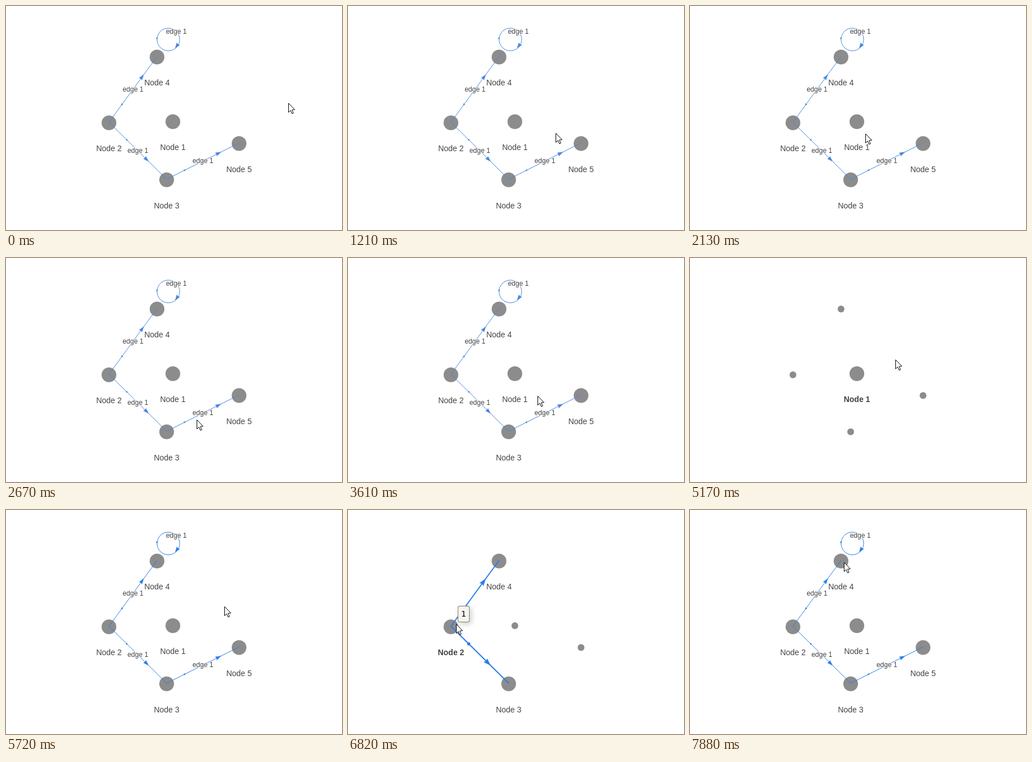
An HTML page with a canvas that plays this animation: 594x395 px, repeating every 8000 ms.

```html
<!DOCTYPE html>
<html lang="en">
<head>
<meta charset="utf-8">
<title>Network graph</title>
<style>
html, body { margin: 0; width: 100%; height: 100%; overflow: hidden; background: #fff; }
canvas { display: block; }
</style>
</head>
<body>
<canvas id="stage" width="594" height="395"></canvas>
<script>
const ctx = document.getElementById('stage').getContext('2d');
const LOOP = 8000, TICK = 76, TIP_DELAY = 300;
const SANS = '"Liberation Sans", Arial, sans-serif';
const TIP_FONT = '14px "DejaVu Sans", Verdana, sans-serif';
const GRAY = '#8c8c8c', INK = '#444', BLUE = '#2b7ce9', SOFT_BLUE = '#4686dc';
const NODE_BOX = 31.5; // half size of the square that dots and arrows keep clear of

const nodes = [
  { id: 1, x: 295, y: 203 },
  { id: 2, x: 182, y: 205 },
  { id: 3, x: 284, y: 305.5 },
  { id: 4, x: 267, y: 89 },
  { id: 5, x: 412, y: 241.5 }
];
const link = (a, b) => ({ from: nodes[a - 1], to: nodes[b - 1] });
const edges = [link(2, 4), link(2, 3), link(3, 5), link(4, 4)];

// Where the pointer goes and rests; a click selects what lies under it
const stops = [
  { leave: 0, arrive: 0, x: 499, y: 171 },
  { leave: 70, arrive: 450, x: 414, y: 239 },
  { leave: 1210, arrive: 1510, x: 300, y: 202 },
  { leave: 2130, arrive: 2670, x: 337, y: 285 },
  { leave: 2750, arrive: 2990, x: 327, y: 282 },
  { leave: 3610, arrive: 4010, x: 349, y: 171 },
  { leave: 4330, arrive: 4480, x: 306, y: 199 },
  { leave: 5090, arrive: 5400, x: 386, y: 170 },
  { leave: 5870, arrive: 6330, x: 191, y: 201 },
  { leave: 6880, arrive: 7180, x: 367, y: 153 },
  { leave: 7500, arrive: 7880, x: 272, y: 92 }
];
const clicks = [4790, 5720, 6580, 7420];

const easeOut = p => 1 - Math.pow(1 - p, 2.4);
const stopAt = t => stops.findLast(s => t >= s.leave);

function pointerAt(t) {
  const stop = stopAt(t);
  if (t >= stop.arrive) return stop;
  const prev = stops[stops.indexOf(stop) - 1];
  const span = stop.arrive - stop.leave;
  const steps = Math.round(span / TICK);
  const done = Math.floor((t - stop.leave) / span * steps + 1e-6) + 1;
  const p = easeOut(done / (steps + 1));
  return {
    x: Math.round(prev.x + (stop.x - prev.x) * p),
    y: Math.round(prev.y + (stop.y - prev.y) * p)
  };
}

const nodeUnder = p => nodes.find(n => Math.abs(p.x - n.x) < 26 && Math.abs(p.y - n.y) < 16);

function edgeUnder(p) {
  return edges.find(({ from, to }) => {
    const dx = to.x - from.x, dy = to.y - from.y, len = Math.hypot(dx, dy);
    const px = p.x - from.x, py = p.y - from.y;
    const along = (px * dx + py * dy) / len;
    return along > 0 && along < len && Math.abs(px * dy - py * dx) / len < 6;
  });
}

function tipAt(t) {
  const stop = stopAt(t);
  if (!stop.leave || t < stop.arrive + TIP_DELAY) return '';
  return nodeUnder(stop) ? '1' : edgeUnder(stop) ? 'to' : '';
}

function selectedAt(t) {
  const click = clicks.findLast(c => t >= c);
  return click && nodeUnder(pointerAt(click));
}

function disc(x, y, r, color) {
  ctx.fillStyle = color;
  ctx.beginPath();
  ctx.arc(x, y, r, 0, Math.PI * 2);
  ctx.fill();
}

function polygon(points) {
  ctx.beginPath();
  points.forEach(([x, y]) => ctx.lineTo(x, y));
  ctx.closePath();
}

function edgeLabel(x, y) {
  ctx.font = '12px ' + SANS;
  ctx.strokeStyle = '#fff';
  ctx.lineWidth = 2;
  ctx.lineJoin = 'round';
  ctx.strokeText('edge 1', x, y);
  ctx.fillStyle = INK;
  ctx.fillText('edge 1', x, y);
}

function arrowHead(x, y, angle, width, color) {
  const size = 7.5 + 3 * width, half = size * 0.33;
  ctx.save();
  ctx.translate(x, y);
  ctx.rotate(angle);
  ctx.fillStyle = color;
  polygon([[0, 0], [-size, half], [-size * 0.9, 0], [-size, -half]]);
  ctx.fill();
  ctx.restore();
}

function drawLine({ from, to }, width, color) {
  const dx = to.x - from.x, dy = to.y - from.y;
  const gap = NODE_BOX / Math.max(Math.abs(dx), Math.abs(dy));
  const at = p => [from.x + dx * p, from.y + dy * p];
  ctx.beginPath();
  ctx.moveTo(...at(0));
  ctx.lineTo(...at(1));
  ctx.stroke();
  disc(...at(gap), width * 1.4, color);
  arrowHead(...at(1 - gap), Math.atan2(dy, dx), width, color);
  return at(0.5);
}

function drawLoop({ from }, width, color) {
  const x = from.x + 20, y = from.y - 30, r = 20, tip = Math.PI * 0.3;
  ctx.beginPath();
  ctx.arc(x, y, r, 0, Math.PI * 2);
  ctx.stroke();
  disc(x - r, y - 2, width * 1.4, color);
  arrowHead(x + r * Math.cos(tip), y + r * Math.sin(tip), Math.PI * 0.69, width, color);
  return [x + r * 0.7, y - r * 0.7];
}

function drawEdge(edge, width, color) {
  ctx.strokeStyle = color;
  ctx.lineWidth = width;
  const [x, y] = (edge.from === edge.to ? drawLoop : drawLine)(edge, width, color);
  if (width === 1) edgeLabel(x, y + 0.5);
}

function drawNode({ id, x, y }, kept, bold) {
  disc(x, y + 1, kept ? 13 : 6, GRAY);
  if (!kept) return;
  ctx.font = (bold ? 'bold ' : '') + '14px ' + SANS;
  ctx.fillStyle = INK;
  ctx.fillText('Node ' + id, x, Math.round(y) + 47);
}

function drawTip(str, pointer) {
  const x = pointer.x + 3, y = pointer.y - 32, h = 29;
  ctx.font = TIP_FONT;
  const w = Math.round(ctx.measureText(str).width) + 12;
  const box = (inset, fill) => {
    ctx.fillStyle = fill;
    ctx.beginPath();
    ctx.roundRect(x + inset, y + inset, w - 2 * inset, h - 2 * inset, 3 - inset);
    ctx.fill();
  };
  ctx.save();
  ctx.shadowColor = 'rgba(0,0,0,0.2)';
  ctx.shadowBlur = 10;
  ctx.shadowOffsetX = ctx.shadowOffsetY = 3;
  box(0, '#808074');
  ctx.restore();
  box(1, '#f5f4ed');
  ctx.fillStyle = '#000';
  ctx.fillText(str, x + w / 2, y + h / 2 + 1);
}

function drawPointer({ x, y }) {
  ctx.save();
  ctx.translate(x + 0.5, y + 0.5);
  polygon([[0, 0], [0, 16], [3.6, 12.6], [6.2, 18.4], [8.6, 17.4], [6.2, 11.6], [11, 11.3]]);
  ctx.fillStyle = '#fff';
  ctx.fill();
  ctx.strokeStyle = '#000';
  ctx.lineWidth = 1;
  ctx.lineJoin = 'miter';
  ctx.stroke();
  ctx.restore();
}

function draw(t) {
  ctx.fillStyle = '#fff';
  ctx.fillRect(0, 0, 594, 395);
  ctx.textAlign = 'center';
  ctx.textBaseline = 'middle';

  const picked = selectedAt(t), pointer = pointerAt(t), tip = tipAt(t);
  const color = t < clicks[0] ? SOFT_BLUE : BLUE;
  const shown = picked ? edges.filter(e => e.from === picked || e.to === picked) : edges;
  const kept = n => !picked || n === picked || shown.some(e => e.from === n || e.to === n);

  nodes.forEach(n => drawNode(n, kept(n), n === picked));
  shown.forEach(e => drawEdge(e, picked ? 2 : 1, color));
  if (tip) drawTip(tip, pointer);
  drawPointer(pointer);
}

const begin = performance.now();
function tick() {
  draw((performance.now() - begin) % LOOP);
  requestAnimationFrame(tick);
}
tick();
</script>
</body>
</html>
```
